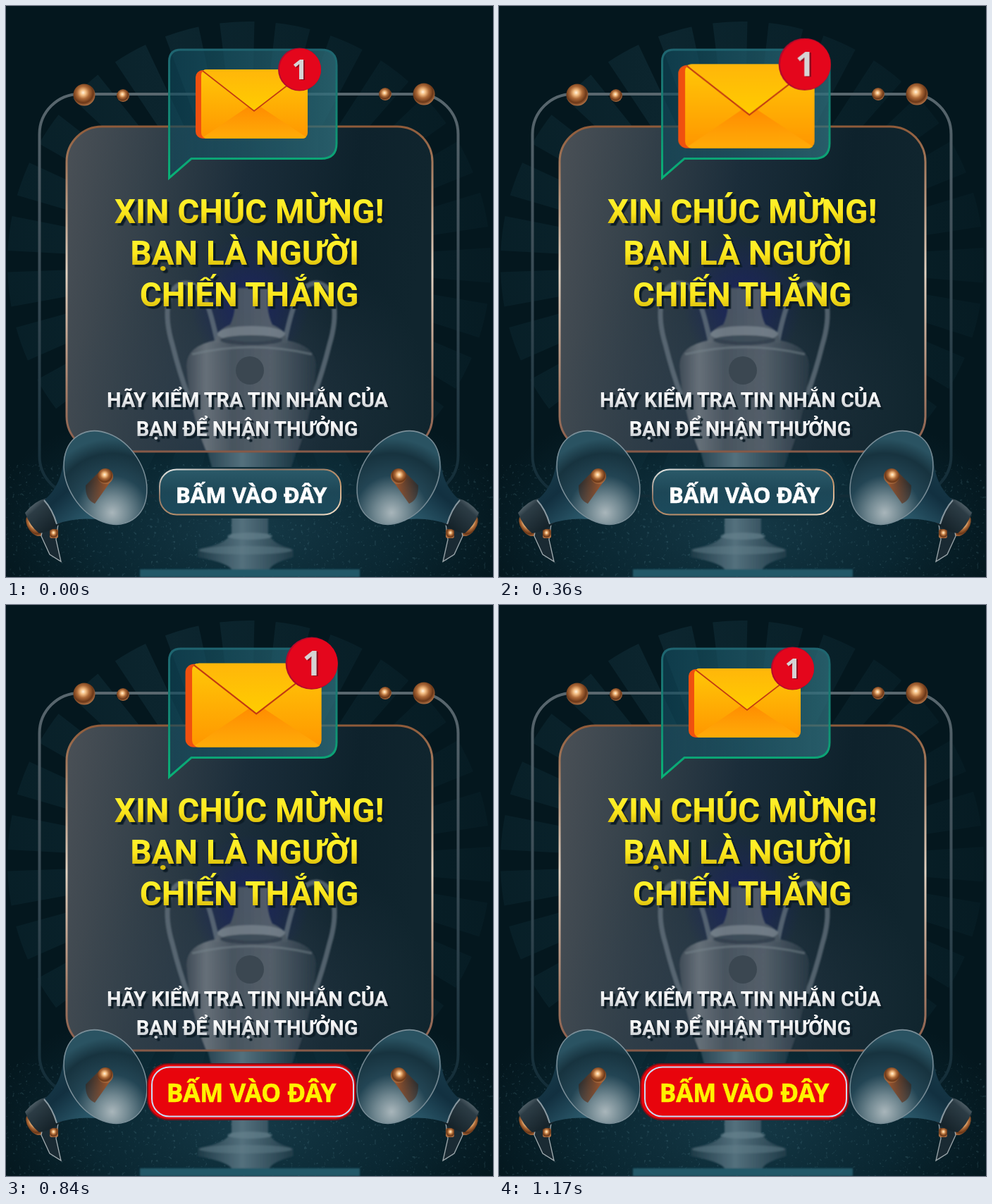
These frames come from a looping animation (691 by 810 pixels, 1200 ms). An HTML page without scripts:

```html
<!DOCTYPE html>
<html lang="vi">
<head>
<meta charset="utf-8">
<title>Xin chúc mừng</title>
<style>
  html, body { margin: 0; width: 100%; height: 100%; overflow: hidden; background: #04171e; }
  svg { display: block; width: 691px; height: 810px; }
  text { text-anchor: middle; }
  .title { font: 700 47.5px Roboto, sans-serif; }
  .note { font: 700 28.9px Roboto, sans-serif; }
  .label { font: 700 31.2px "Noto Sans", sans-serif; stroke-width: .7px; }
  .alert .label { font-size: 35px; }
  .badge { font: 700 40px "Open Sans", sans-serif; }

  .mail { transform-origin: 337px 124px; animation: pulse 1.2s infinite; }
  .calm { animation: show 1.2s step-end infinite; }
  .alert { animation: show 1.2s -.6s step-end infinite; }

  /* 30 ms ticks: ten up, ten down, ten up, nine down */
  @keyframes pulse {
    0%, 50% { transform: scale(1); animation-timing-function: steps(10); }
    25% { transform: scale(1.27); animation-timing-function: steps(10); }
    75% { transform: scale(1.27); animation-timing-function: steps(9); }
    97.5%, 100% { transform: scale(1); }
  }
  @keyframes show {
    0% { visibility: visible; }
    50%, 100% { visibility: hidden; }
  }
</style>
</head>
<body>
<svg viewBox="0 0 691 810">
  <defs>
    <linearGradient id="rayFade" gradientUnits="userSpaceOnUse" x1="0" y1="20" x2="0" y2="720">
      <stop offset="0" stop-color="#17404d" stop-opacity=".2"/>
      <stop offset=".4" stop-color="#1b3f4c" stop-opacity=".36"/>
      <stop offset="1" stop-color="#17404d" stop-opacity=".1"/>
    </linearGradient>
    <radialGradient id="floor" gradientUnits="userSpaceOnUse" cx="345" cy="740" r="380" gradientTransform="matrix(1 0 0 .5 0 370)">
      <stop offset="0" stop-color="#163a48"/>
      <stop offset=".6" stop-color="#0c2c38" stop-opacity=".75"/>
      <stop offset="1" stop-color="#0a2731" stop-opacity="0"/>
    </radialGradient>
    <linearGradient id="rail" x2="0" y2="1">
      <stop offset="0" stop-color="#59676e"/>
      <stop offset=".3" stop-color="#43535c"/>
      <stop offset="1" stop-color="#122c37"/>
    </linearGradient>
    <linearGradient id="pane" x2="1" y2=".12">
      <stop offset="0" stop-color="#4a5056"/>
      <stop offset=".22" stop-color="#36424b"/>
      <stop offset=".5" stop-color="#1b2d3a"/>
      <stop offset=".8" stop-color="#0e222c"/>
      <stop offset="1" stop-color="#10252e"/>
    </linearGradient>
    <radialGradient id="haze" cx=".5" cy=".85" r=".5">
      <stop offset="0" stop-color="#414f5f" stop-opacity=".5"/>
      <stop offset="1" stop-color="#33434f" stop-opacity="0"/>
    </radialGradient>
    <radialGradient id="blueGlow">
      <stop offset="0" stop-color="#1a2066" stop-opacity=".8"/>
      <stop offset="1" stop-color="#1a2066" stop-opacity="0"/>
    </radialGradient>
    <linearGradient id="bronze" x2="0" y2="1">
      <stop offset="0" stop-color="#8f5b3a"/>
      <stop offset=".15" stop-color="#a98267"/>
      <stop offset=".45" stop-color="#dfd0c0"/>
      <stop offset=".8" stop-color="#a8806a"/>
      <stop offset="1" stop-color="#865a48"/>
    </linearGradient>
    <linearGradient id="silver">
      <stop offset="0" stop-color="#434e59"/>
      <stop offset=".15" stop-color="#6d777f"/>
      <stop offset=".35" stop-color="#4d5862"/>
      <stop offset=".65" stop-color="#59646e"/>
      <stop offset="1" stop-color="#293a46"/>
    </linearGradient>
    <linearGradient id="stem">
      <stop offset="0" stop-color="#1d3a47"/>
      <stop offset=".45" stop-color="#54707d"/>
      <stop offset="1" stop-color="#1b3744"/>
    </linearGradient>
    <radialGradient id="copper" cx=".45" cy=".4" r=".62">
      <stop offset="0" stop-color="#fff3dc"/>
      <stop offset=".2" stop-color="#f3bd82"/>
      <stop offset=".45" stop-color="#ad6a38"/>
      <stop offset=".75" stop-color="#6a3718"/>
      <stop offset="1" stop-color="#b9794a"/>
    </radialGradient>
    <linearGradient id="bubble">
      <stop offset="0" stop-color="#10485a" stop-opacity=".65"/>
      <stop offset="1" stop-color="#2f6f7c" stop-opacity=".75"/>
    </linearGradient>
    <linearGradient id="bubbleEdge" x2="0" y2="1">
      <stop offset="0" stop-color="#1f6470"/>
      <stop offset=".5" stop-color="#138573"/>
      <stop offset="1" stop-color="#08b276"/>
    </linearGradient>
    <linearGradient id="flap" x2="0" y2="1">
      <stop offset="0" stop-color="#ffb60a"/>
      <stop offset="1" stop-color="#ffcd00"/>
    </linearGradient>
    <linearGradient id="paper" x2="0" y2="1">
      <stop offset="0" stop-color="#ffc808"/>
      <stop offset="1" stop-color="#ff9600"/>
    </linearGradient>
    <linearGradient id="fold" x2="0" y2="1">
      <stop offset="0" stop-color="#ff8900"/>
      <stop offset="1" stop-color="#ffac08"/>
    </linearGradient>
    <linearGradient id="gold" x2="0" y2="1">
      <stop offset=".25" stop-color="#fff02a"/>
      <stop offset=".55" stop-color="#fbe51c"/>
      <stop offset=".85" stop-color="#d8bd0c"/>
    </linearGradient>
    <linearGradient id="white" x2="0" y2="1">
      <stop offset=".3" stop-color="#fff"/>
      <stop offset=".85" stop-color="#c9ced3"/>
    </linearGradient>
    <linearGradient id="teal" x2="0" y2="1">
      <stop offset="0" stop-color="#2b5a69"/>
      <stop offset=".5" stop-color="#1d4757"/>
      <stop offset="1" stop-color="#1b4a5c"/>
    </linearGradient>
    <linearGradient id="trim" x2="1" y2="1">
      <stop offset="0" stop-color="#e9efee"/>
      <stop offset=".3" stop-color="#8d7565"/>
      <stop offset=".65" stop-color="#c9996e"/>
      <stop offset="1" stop-color="#f0e0cc"/>
    </linearGradient>
    <radialGradient id="mouth" gradientUnits="userSpaceOnUse" cx="188" cy="688" r="105">
      <stop offset="0" stop-color="#a9b6bb"/>
      <stop offset=".22" stop-color="#718891"/>
      <stop offset=".5" stop-color="#234554"/>
      <stop offset=".8" stop-color="#17333f"/>
      <stop offset="1" stop-color="#2a5362"/>
    </radialGradient>
    <linearGradient id="shell" x2="1" y2="1">
      <stop offset="0" stop-color="#1d4352"/>
      <stop offset=".4" stop-color="#123040"/>
      <stop offset=".75" stop-color="#2c5a6c"/>
      <stop offset="1" stop-color="#10303d"/>
    </linearGradient>
    <linearGradient id="cone" x2="1" y2="0">
      <stop offset="0" stop-color="#3a1d10" stop-opacity=".5"/>
      <stop offset="1" stop-color="#a8582a"/>
    </linearGradient>
    <linearGradient id="grip" x2="1" y2="1">
      <stop offset="0" stop-color="#8d9aa1"/>
      <stop offset=".3" stop-color="#2c3c45"/>
      <stop offset="1" stop-color="#0a161c"/>
    </linearGradient>
    <filter id="shade" x="-10%" y="-30%" width="120%" height="160%">
      <feDropShadow dx="3.5" dy="3.5" stdDeviation=".6" flood-color="#0f1d27"/>
    </filter>
    <filter id="soft"><feGaussianBlur stdDeviation="1.2"/></filter>
    <filter id="dust" x="0" y="0" width="1" height="1">
      <feTurbulence type="fractalNoise" baseFrequency=".22" numOctaves="2" seed="4"/>
      <feColorMatrix values="0 0 0 0 .2  0 0 0 0 .45  0 0 0 0 .53  7 0 0 0 -4.6"/>
    </filter>

    <g id="horn">
      <ellipse cx="41" cy="737" rx="10" ry="17" transform="rotate(-35 41 737)" fill="url(#copper)"/>
      <path d="M52 741 74 735 71 757 78 788 62 778 50 752Z" fill="#1a2a33" stroke="#a3adb1" stroke-width="1.3"/>
      <rect x="62" y="742" width="12" height="13" rx="3" fill="url(#copper)"/>
      <path d="M27 719Q40 702 58 698L84 728Q66 746 47 748Q34 738 27 719Z" fill="url(#grip)"/>
      <path d="M82 638Q80 680 54 701Q66 714 72 735Q110 720 168 735Z" fill="url(#shell)"/>
      <path d="M54 701Q66 714 72 735" fill="none" stroke="#8b9aa2" stroke-width="2"/>
      <ellipse cx="141" cy="669" rx="71" ry="53" transform="rotate(57 141 669)" fill="url(#mouth)" stroke="#7b8f99" stroke-width="1.5"/>
      <path d="M113 680 134 659 148 675 126 706Q112 700 113 680Z" fill="url(#cone)"/>
      <circle cx="141" cy="667" r="11" fill="url(#copper)"/>
    </g>
  </defs>

  <rect width="691" height="810" fill="#04171e"/>
  <circle cx="345" cy="365" r="220" fill="none" stroke="url(#rayFade)" stroke-width="246"
    pathLength="27" stroke-dasharray=".62 .38" transform="rotate(-97 345 365)"/>
  <rect y="545" width="691" height="265" fill="url(#floor)"/>
  <rect y="650" width="691" height="160" filter="url(#dust)" opacity=".16"/>

  <!-- cup foot -->
  <g filter="url(#soft)">
    <path d="M286 632H412Q395 690 372 722V748Q378 764 408 770V782Q376 790 372 802H322Q318 790 272 782V770Q312 764 320 748V722Q300 690 286 632Z" fill="url(#stem)"/>
    <ellipse cx="346" cy="752" rx="32" ry="5" fill="#688490" opacity=".6"/>
    <ellipse cx="340" cy="772" rx="66" ry="6" fill="#65818d" opacity=".45"/>
    <rect x="190" y="799" width="312" height="11" fill="#225867"/>
  </g>

  <rect x="47.500" y="125" width="594" height="570" rx="57" fill="none" stroke="url(#rail)" stroke-width="4"/>

  <rect x="86" y="171" width="519" height="461" rx="50" fill="url(#pane)"/>
  <rect x="86" y="171" width="519" height="461" rx="50" fill="url(#haze)"/>
  <ellipse cx="346" cy="420" rx="85" ry="95" fill="url(#blueGlow)"/>

  <!-- cup body -->
  <g filter="url(#soft)">
    <g fill="none" stroke="#66757f" stroke-width="7" opacity=".75">
      <path id="handle" d="M300 478C292 440 282 392 254 393C226 396 224 440 236 480Q246 520 258 552"/>
      <use href="#handle" transform="matrix(-1 0 0 1 695 0)"/>
    </g>
    <path d="M324 400H372Q368 432 378 452Q398 460 398 474Q440 482 440 510Q436 575 414 632H284Q260 575 256 510Q256 482 298 474Q298 460 318 452Q328 432 324 400Z" fill="url(#silver)" opacity=".9"/>
    <ellipse cx="348" cy="465" rx="48" ry="11" fill="#86919a" opacity=".6"/>
    <ellipse cx="348" cy="474" rx="44" ry="7" fill="#2b3a46" opacity=".7"/>
    <path d="M264 494Q348 474 434 494" fill="none" stroke="#7b8790" stroke-width="3" opacity=".5"/>
  </g>
  <circle cx="346" cy="517" r="20" fill="#3b4751"/>

  <rect x="86" y="171" width="519" height="461" rx="50" fill="none" stroke="url(#bronze)" stroke-width="3"/>

  <g fill="url(#copper)">
    <circle cx="111" cy="126" r="15.500"/>
    <circle cx="166" cy="127" r="9"/>
    <circle cx="538" cy="125" r="9"/>
    <circle cx="593" cy="125" r="15.500"/>
  </g>

  <path d="M231.500 244V78Q232 62 248 62H447Q469 62 469 84V195Q469 216.500 447 216.500H263Z" fill="url(#bubble)" stroke="url(#bubbleEdge)" stroke-width="3"/>

  <g class="mail">
    <rect x="269" y="91" width="60" height="97" rx="10" fill="#f0500f"/>
    <rect x="277" y="90" width="151" height="98" rx="8" fill="url(#paper)"/>
    <path d="M280 186 352 137 426 186Q424 188 420 188H285Q282 188 280 186Z" fill="url(#fold)"/>
    <path d="M279 92Q281 90 285 90H420Q424 90 426 92L352 149Z" fill="url(#flap)"/>
    <path d="M279 92 352 149 426 92" fill="none" stroke="#c23a12" stroke-width="1.700"/>
    <circle cx="416.500" cy="90" r="30.500" fill="#b3092c"/>
    <circle cx="417.500" cy="90" r="29.500" fill="#e4061c"/>
    <text class="badge" x="419" y="105" fill="#8e0a1c">1</text>
    <text class="badge" x="417" y="104" fill="#d6d3d4">1</text>
  </g>

  <g class="title" fill="url(#gold)" filter="url(#shade)">
    <text x="345" y="307.500">XIN CHÚC MỪNG!</text>
    <text x="338.500" y="366.500">BẠN LÀ NGƯỜI</text>
    <text x="345" y="426">CHIẾN THẮNG</text>
  </g>
  <g class="note" fill="url(#white)" filter="url(#shade)">
    <text x="342.500" y="569">HÃY KIỂM TRA TIN NHẮN CỦA</text>
    <text x="342" y="610">BẠN ĐỂ NHẬN THƯỞNG</text>
  </g>

  <use href="#horn"/>
  <use href="#horn" transform="matrix(-1 0 0 1 698 0)"/>

  <g class="calm">
    <rect x="214" y="654" width="266" height="73" rx="27" fill="#0f2f3b"/>
    <rect x="218" y="657.500" width="257" height="64" rx="24" fill="url(#teal)" stroke="url(#trim)" stroke-width="2"/>
    <text class="label" x="348" y="705" fill="#fff" stroke="#fff">BẤM VÀO ĐÂY</text>
  </g>
  <g class="alert">
    <rect x="200" y="650" width="297" height="81" rx="30" fill="#7d0f18"/>
    <rect x="202" y="652" width="293" height="77" rx="28" fill="#e8040c"/>
    <rect x="207" y="655.500" width="286" height="70" rx="25" fill="#e8040c" stroke="#c9dcf5" stroke-width="2"/>
    <text class="label" x="348" y="705" fill="#fff200" stroke="#fff200">BẤM VÀO ĐÂY</text>
  </g>
</svg>
</body>
</html>
```
